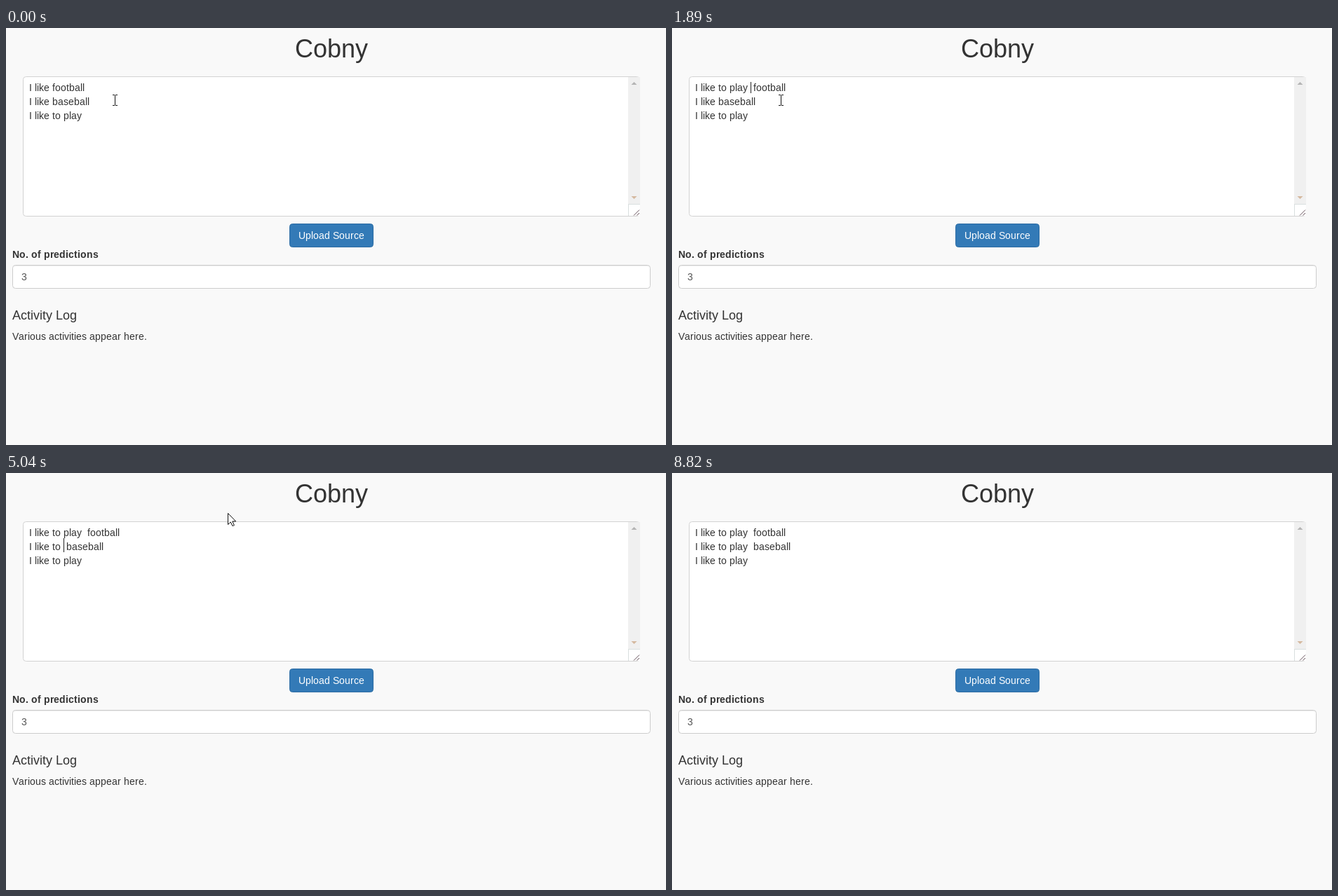
Animation of 941 by 595 pixels, one loop 8890 ms. Source, as an HTML page with a canvas:

```html
<!DOCTYPE html>
<html lang="en">
<head>
<meta charset="utf-8">
<title>Cobny</title>
<style>
  html, body { margin: 0; width: 100%; height: 100%; overflow: hidden; background: #f9f9f9; }
  canvas { display: block; }
</style>
</head>
<body>
<canvas id="stage" width="941" height="595"></canvas>
<script>
const ctx = document.getElementById('stage').getContext('2d');
const LOOP = 8890, TICK = 70;
const SANS = '"Liberation Sans", Arial, sans-serif';
const BODY = '14px ' + SANS;
const TEXT_X = 33;

// Text typed after "I like" on each line: [time, text]
const typed = [
  [[0, ''], [140, ' '], [1050, ' to '], [1890, ' to play ']],
  [[0, ''], [3990, ' '], [5040, ' to '], [6020, ' to play ']]
];
const endings = [' football', ' baseball'];

// Suggestion lists; picks are the times when the highlight moves down
const likeWords = ['football', 'baseball', 'to'];
const popups = [
  { from: 210, to: 1050, line: 0, words: likeWords, picks: [560, 630] },
  { from: 1120, to: 1890, line: 0, words: ['football', 'play'], picks: [1610] },
  { from: 1960, to: 3360, line: 0, words: ['football'], picks: [] },
  { from: 4060, to: 5040, line: 1, words: likeWords, picks: [4550, 4760] },
  { from: 5110, to: 6020, line: 1, words: ['play', 'football', 'baseball'], picks: [] },
  { from: 6090, to: 7420, line: 1, words: ['football', 'baseball'], picks: [] }
];

const SECOND_LINE = 3220;
const caretOn = [
  [140, 700], [1050, 1610], [1890, 2450], [2940, 3710], [3990, 4550],
  [5040, 5600], [6020, 6580], [7140, 7910], [8470, 8820]
];

// Pointer stops: [time, x, y]
const pointerStops = [
  [0, 155, 103], [2310, 155, 103], [3010, 55, 105], [3570, 55, 105], [3850, 316, 57],
  [6860, 316, 57], [7350, 662, 440], [7490, 657, 446], [7630, 657, 446], [8330, 873, 600]
];

const arrowShape = new Path2D('M.5 .5V16.5L4.3 13L7 18.6L9.4 17.5L6.8 12H11.7Z');
const handShape = new Path2D('M6.5 .5c-1 0-1.5.7-1.5 1.5v10l-1.5-2c-.8-1-3-.8-3 .7 0 .8 4 6.8 5 8' +
  ' .5.8 1 1.5 1 3.8h8c0-2.5 1.8-4 1.8-7v-6.5c0-1.8-2.3-1.8-2.6-.4 0-2-2.8-2.2-3-.6' +
  ' 0-1.8-2.9-1.8-3-.2V2c0-.8-.5-1.5-1.2-1.5z');
const handCreases = new Path2D('M7.7 7.8v4M10.7 8v4M13.7 8.6v3.5');

function rect(x, y, w, h, color) {
  ctx.fillStyle = color;
  ctx.fillRect(x, y, w, h);
}

function panel(x, y, w, h, fill, border, radius = 4) {
  ctx.beginPath();
  ctx.roundRect(x + .5, y + .5, w - 1, h - 1, radius);
  ctx.fillStyle = fill;
  ctx.fill();
  ctx.strokeStyle = border;
  ctx.lineWidth = 1;
  ctx.stroke();
}

const advance = ch => Math.round(ctx.measureText(ch).width);

// Letters advance by whole pixels; returns the end of the text
function text(str, x, y, color = '#333', font = BODY) {
  ctx.font = font;
  ctx.fillStyle = color;
  for (const ch of str) {
    ctx.fillText(ch, x, y);
    x += advance(ch);
  }
  return x;
}

function triangle(x, y, dir, color) {
  ctx.beginPath();
  ctx.moveTo(x - 4, y);
  ctx.lineTo(x + 4, y);
  ctx.lineTo(x, y + 4 * dir);
  ctx.fillStyle = color;
  ctx.fill();
}

function drawPage() {
  rect(0, 0, 941, 595, '#f9f9f9');
  text('Cobny', 412, 42, '#333', '36px ' + SANS);

  panel(24, 69, 880, 200, '#fff', '#d2d2d2');
  rect(887, 70, 17, 181, '#f0f0f0');
  triangle(895.5, 81, -1, '#b4b4b4');
  triangle(895.5, 240, 1, '#d5b99f');
  rect(887, 251, 17, 17, '#fff');
  rect(887, 251, 17, 1, '#d9dfdf');
  rect(887, 251, 1, 17, '#d9dfdf');
  ctx.beginPath();
  ctx.moveTo(895, 267.5);
  ctx.lineTo(903, 259.5);
  ctx.moveTo(899.5, 267.5);
  ctx.lineTo(903, 264);
  ctx.strokeStyle = '#65505a';
  ctx.stroke();

  panel(404, 279, 120, 34, '#337ab7', '#2e6da4');
  text('Upload Source', 417, 301, '#fff');
  text('No. of predictions', 9, 328, '#333', 'bold ' + BODY);
  panel(9, 338, 910, 34, '#fff', '#ccc');
  rect(12, 339, 904, 1, 'rgba(0,0,0,.075)');
  text('3', 22, 360, '#555');
  text('Activity Log', 9, 416, '#333', '18px ' + SANS);
  text('Various activities appear here.', 9, 445);
}

// Draws the editor text and returns the insertion x of both changing lines
function drawLines(t) {
  const ends = typed.map((steps, i) => {
    const added = steps.filter(s => s[0] <= t).pop()[1];
    const y = 90 + 20 * i;
    const x = text('I like' + added, TEXT_X, y);
    text(endings[i], x, y);
    return x;
  });
  text('I like to play', TEXT_X, 130);
  return ends;
}

function drawCaret(t, ends) {
  if (!caretOn.some(([on, off]) => t >= on && t < off)) return;
  if (t < SECOND_LINE) rect(ends[0], 77, 1, 16, '#222');
  else rect(ends[1], 93, 1, 20, '#222');
}

// Returns the box of the open list, if any
function drawPopup(t, ends) {
  const p = popups.find(q => t >= q.from && t < q.to);
  if (!p) return null;
  const box = { x: ends[p.line] - 5, y: 94 + 20 * p.line, w: 120, h: 31 * p.words.length + 2 };
  const chosen = p.picks.filter(at => at <= t).length;
  ctx.save();
  ctx.shadowColor = 'rgba(0,0,0,.16)';
  ctx.shadowBlur = 5;
  panel(box.x, box.y, box.w, box.h, '#fff', '#ddd', 3);
  ctx.restore();
  p.words.forEach((word, i) => {
    const y = box.y + 1 + 31 * i;
    if (i === chosen) rect(box.x + 1, y, 118, 30, '#36f');
    rect(box.x + 1, y + 30, 118, 1, '#ddd');
    text(word, box.x + 11, y + 20, i === chosen ? '#fff' : '#000');
  });
  return box;
}

function pointerAt(t) {
  const i = pointerStops.findIndex(s => s[0] > t);
  if (i < 0) return null;
  const [t0, x0, y0] = pointerStops[i - 1], [t1, x1, y1] = pointerStops[i];
  const k = (t - t0) / (t1 - t0), e = k * k * (3 - 2 * k);
  return { x: Math.round(x0 + (x1 - x0) * e), y: Math.round(y0 + (y1 - y0) * e) };
}

const inside = (p, b) => p.x >= b.x && p.x < b.x + b.w && p.y >= b.y && p.y < b.y + b.h;
const editor = { x: 24, y: 69, w: 863, h: 200 };
const field = { x: 9, y: 338, w: 910, h: 34 };

function drawShape(shape, x, y) {
  ctx.save();
  ctx.translate(x, y);
  ctx.fillStyle = '#fff';
  ctx.fill(shape);
  ctx.strokeStyle = '#111';
  ctx.lineWidth = 1;
  ctx.stroke(shape);
  if (shape === handShape) ctx.stroke(handCreases);
  ctx.restore();
}

function drawPointer(t, popup) {
  const p = pointerAt(t);
  if (!p) return;
  if (popup && inside(p, popup)) {
    drawShape(handShape, p.x, p.y + 1);
  } else if (inside(p, editor) || inside(p, field)) {
    rect(p.x, p.y - 7, 1, 14, '#111');
    for (const y of [p.y - 8, p.y + 7]) {
      rect(p.x - 3, y, 3, 1, '#111');
      rect(p.x + 1, y, 3, 1, '#111');
    }
  } else {
    drawShape(arrowShape, p.x, p.y);
  }
}

function draw(now) {
  const t = Math.floor((now % LOOP) / TICK) * TICK;
  drawPage();
  const ends = drawLines(t);
  drawCaret(t, ends);
  drawPointer(t, drawPopup(t, ends));
}

const start = performance.now();
function loop() {
  draw(performance.now() - start);
  requestAnimationFrame(loop);
}
loop();
</script>
</body>
</html>
```
